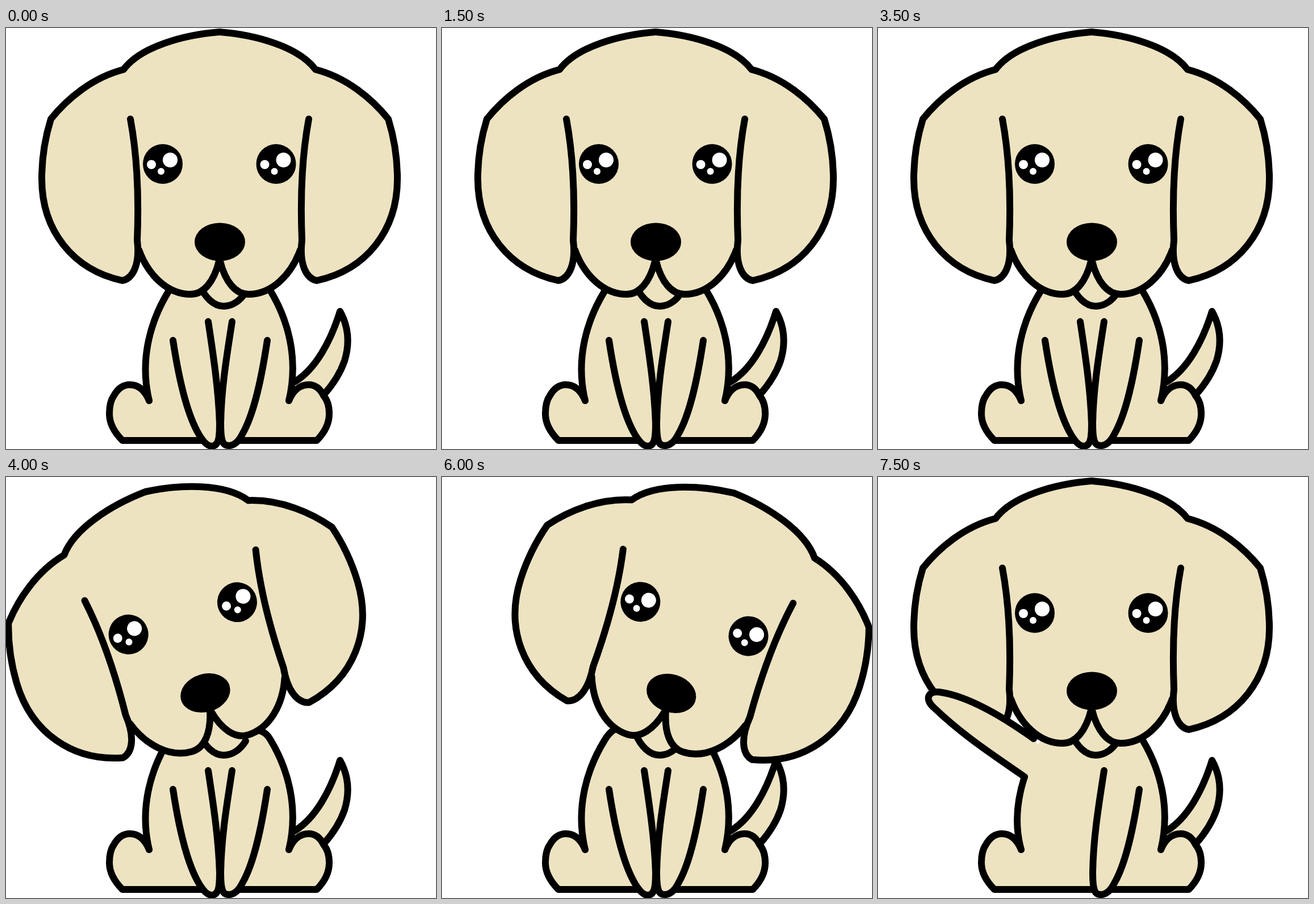
An HTML page for the animation above (7750 ms loop, 757 by 740 pixels).

```html
<!DOCTYPE html>
<html lang="en">
<head>
<meta charset="utf-8">
<title>Puppy</title>
<style>
  html, body { margin: 0; width: 100%; height: 100%; overflow: hidden; background: #fff; }
  svg { display: block; width: 100%; height: 100%; }
  .fill { fill: #ede3c1; stroke: none; }
  .line { fill: none; }
  .both { fill: #ede3c1; }
</style>
</head>
<body>
<svg viewBox="0 0 757 740" stroke="#000" stroke-width="12" stroke-linecap="round" stroke-linejoin="round">
  <defs>
    <path id="skin" class="fill" d="M368 7H376C440 12 515 33 545 73C600 87 645 125 673 160C683 192 689 225 689 265C689 355 635 425 547 444C528 440 516 415 521 373L518 388C502 432 468 468 427 468C404 468 386 446 377 410H368Z"/>
    <g id="edge" class="line">
      <path d="M376 7C440 12 515 33 545 73C600 87 645 125 673 160C683 192 689 225 689 265C689 355 635 425 547 444C528 440 516 415 521 373C518 300 520 230 533 160"/>
      <path d="M518 390C502 434 468 468 427 468C404 468 386 446 377 410"/>
    </g>
    <g id="eye" stroke="none">
      <circle r="35"/>
      <g fill="#fff">
        <circle cx="13" cy="-7" r="13"/>
        <circle cx="-20" cy="1" r="8"/>
        <circle cx="-3" cy="13" r="6"/>
      </g>
    </g>
  </defs>

  <path id="tail" class="both"/>

  <path class="fill" d="M305 443L286 463C255 515 241 570 246 635Q234 627 218 627C195 627 182 655 182 678C182 700 193 712 205 725H547C560 712 569 698 569 678C569 655 555 627 533 627Q517 627 504 635C510 570 494 515 465 461L447 446Z"/>
  <path class="line" id="flank"/>
  <path class="line" d="M447 446Q458 449 465 461C496 512 516 580 498 655"/>
  <path class="line" d="M252 655C245 638 234 627 218 627C207 627 198 632 190 646C185 653 182 662 182 678C182 697 192 712 205 725H547C560 712 569 697 569 678C569 662 565 653 559 646C552 632 543 627 533 627C517 627 505 638 498 655"/>
  <path class="both" id="pawDown" d="M294 549C304 615 319 680 340 715C350 731 356 735 363 735C374 734 376 722 376 695C374 635 365 575 356 516"/>
  <path class="both" d="M398 516C388 580 379 635 378 695C378 725 381 734 392 734C401 734 409 728 416 714C437 678 450 615 460 549"/>

  <path class="fill" d="M340 450L370 400H390L422 464C412 480 398 489 383 489C366 489 350 474 340 450Z"/>
  <path class="line" d="M340 450C350 474 366 489 383 489C398 489 412 480 422 464"/>

  <g id="head">
    <use href="#skin"/>
    <use href="#skin" transform="matrix(-1 0 0 1 752 0)"/>
    <use href="#edge"/>
    <use href="#edge" transform="matrix(-1 0 0 1 752 0)"/>
    <ellipse cx="376.5" cy="376" rx="44.5" ry="33.5" stroke="none"/>
    <g id="eyes">
      <use href="#eye" x="276" y="239"/>
      <use href="#eye" x="475.5" y="239"/>
    </g>
  </g>

  <g id="pawUp">
    <path class="fill" d="M275 460C225 425 160 385 108 378C85 376 82 392 98 405C150 455 205 490 258 527L300 500Z"/>
    <path class="line" d="M274 460C225 425 160 385 108 378C86 376 83 392 98 405C150 455 205 490 258 527"/>
  </g>
</svg>
<script>
const STEP = 250, STEPS = 31;
const el = id => document.getElementById(id);
const between = (n, a, b) => n >= a && n <= b;

const tails = [
  'M508 622C545 600 572 550 588 498C606 530 603 562 596 585C588 608 576 626 560 644',
  'M540 635C580 628 615 605 647 576C649 602 638 623 624 638C610 652 594 664 568 674'
];
const flanks = [
  'M305 443Q294 449 286 463C256 512 234 580 252 655',
  'M258 527C244 570 240 612 252 655'
];

function tilt(n) {
  if (between(n, 8, 11) || between(n, 16, 18)) return -16.5;
  return between(n, 22, 24) ? 17.6 : 0;
}

function lids(n) {
  if (n === 4) return 0.25;
  return n === 3 || n === 5 ? 0.62 : 1;
}

function draw(ms) {
  const n = Math.floor(ms / STEP) % STEPS;
  const wave = n >= 27;
  el('tail').setAttribute('d', tails[n % 2]);
  el('flank').setAttribute('d', flanks[+wave]);
  el('pawDown').style.display = wave ? 'none' : '';
  el('pawUp').style.display = wave ? '' : 'none';
  el('head').setAttribute('transform', `rotate(${tilt(n)} 376 466)`);
  el('eyes').setAttribute('transform', `translate(0 274) scale(1 ${lids(n)}) translate(0 -274)`);
}

const start = performance.now();
function tick() {
  draw(performance.now() - start);
  requestAnimationFrame(tick);
}
tick();
</script>
</body>
</html>
```
